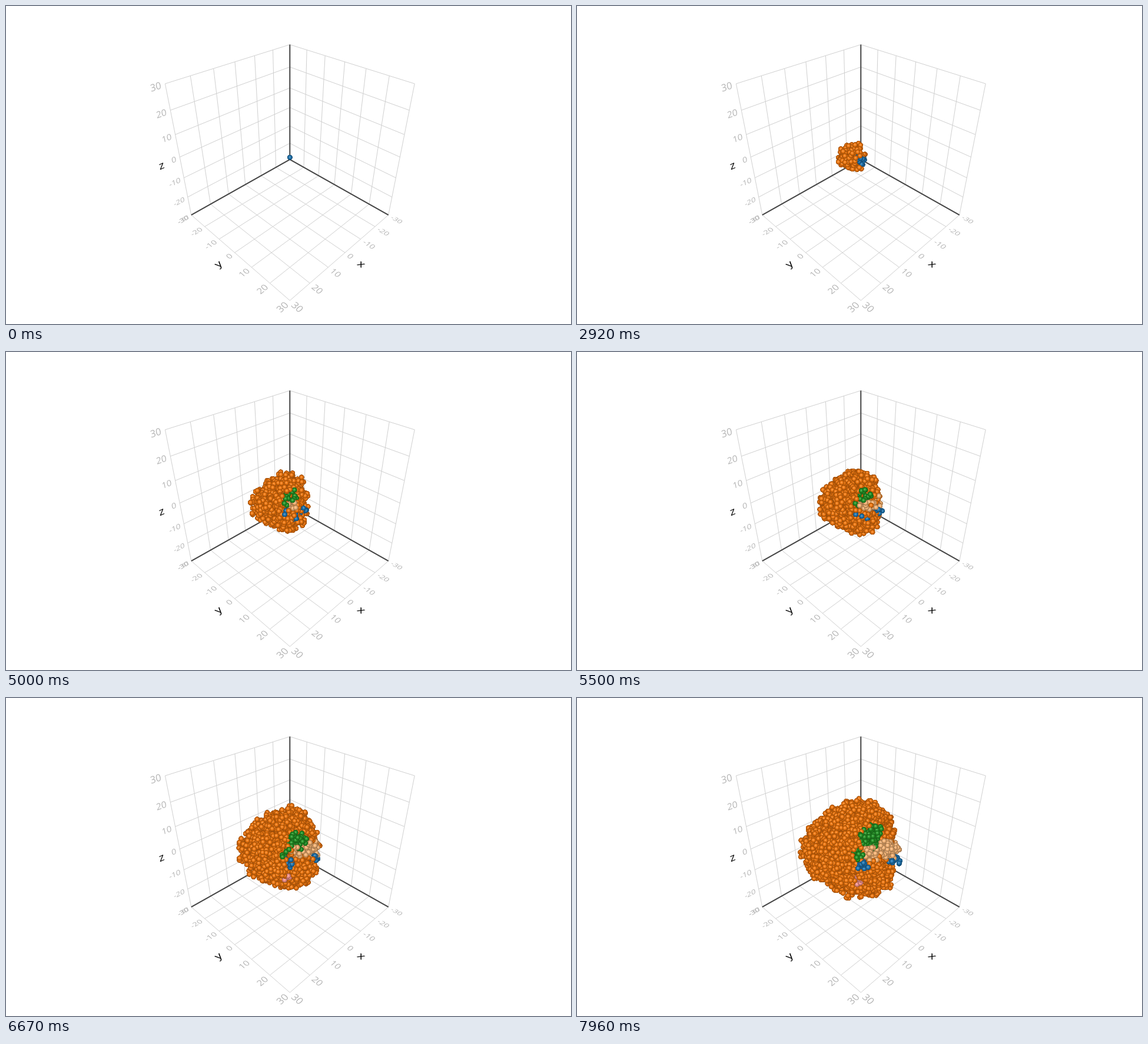
Recreate the animation shown at these times as an HTML page with a canvas. Size 960 by 540 pixels, loop 8000 ms.

```html
<!DOCTYPE html>
<html lang="en">
<head>
<meta charset="utf-8">
<title>Growing cell cluster</title>
<style>
html, body { margin: 0; width: 100%; height: 100%; overflow: hidden; background: #fff; }
canvas { display: block; }
</style>
</head>
<body>
<canvas id="stage" width="960" height="540"></canvas>
<script>
const W = 960, H = 540, LOOP = 8000, STEP = 1000 / 24;
const ctx = document.getElementById('stage').getContext('2d');

// ---- 3D box: coordinates run from -1 to 1 on each axis ----
function project([x, y, z]) {
  const u = (x + y) / 2, v = (y - x) / 2;
  const w = 1 - 0.2385 * u - 0.1173 * z;
  return [482.3 + 187.1 * v / w, (256.5 + 43 * u - 140 * z) / w];
}

function line(g, a, b) {
  g.beginPath();
  g.moveTo(...project(a));
  g.lineTo(...project(b));
  g.stroke();
}

// Text lying in the plane spanned by the directions "along" and "up".
function label(g, text, p, along, up, size, align) {
  const eps = 0.01, px = 20;
  const o = project(p);
  const slope = d => {
    const q = project(p.map((c, i) => c + d[i] * eps));
    return [0, 1].map(i => (q[i] - o[i]) / eps * size / px);
  };
  const a = slope(along), b = slope(up);
  g.save();
  g.setTransform(a[0], a[1], -b[0], -b[1], o[0], o[1]);
  g.font = px + 'px "Open Sans", sans-serif';
  g.textAlign = align;
  g.fillText(text, 0, 0.357 * px);
  g.restore();
}

function buildScene() {
  const c = document.createElement('canvas');
  c.width = W;
  c.height = H;
  const g = c.getContext('2d');
  g.fillStyle = '#fff';
  g.fillRect(0, 0, W, H);

  const ticks = [-3, -2, -1, 0, 1, 2, 3];
  g.strokeStyle = '#d0d0d0';
  g.lineWidth = 1;
  for (const i of ticks) {
    const k = i / 3;
    line(g, [k, -1, -1], [k, 1, -1]);
    line(g, [-1, k, -1], [1, k, -1]);
    line(g, [-1, k, -1], [-1, k, 1]);
    line(g, [-1, -1, k], [-1, 1, k]);
    line(g, [k, -1, -1], [k, -1, 1]);
    line(g, [-1, -1, k], [1, -1, k]);
  }

  g.strokeStyle = '#444';
  g.lineWidth = 2;
  for (const end of [[1, -1, -1], [-1, 1, -1], [-1, -1, 1]]) line(g, [-1, -1, -1], end);

  const left = [-1, 0, 0], right = [0, 1, 0];
  const upX = [-1, 0, 0], upY = [0, -1, 0], upZ = [0, 0, 1];
  const near = 1.053, far = 1.26, tickSize = 0.115, titleSize = 0.15;
  g.fillStyle = '#b4b4b4';
  for (const i of ticks) {
    const k = i / 3, text = String(i * 10);
    label(g, text, [k, near, -1], right, upX, tickSize, 'left');
    label(g, text, [near, k, -1], left, upY, tickSize, 'right');
    label(g, text, [near, -1, k], left, upZ, tickSize, 'right');
  }
  g.fillStyle = '#000';
  label(g, 'x', [0, far, -1], right, upX, titleSize, 'center');
  label(g, 'y', [far, 0, -1], left, upY, titleSize, 'center');
  label(g, 'z', [far, -1, 0], left, upZ, titleSize, 'center');
  return c;
}

// ---- Shaded balls ----
const BALL = 4.5;
const COLORS = {
  orange: [246, 122, 14],
  blue: [31, 119, 180],
  green: [36, 150, 38],
  peach: [250, 183, 118],
  pink: [250, 150, 146]
};

function makeBall(rgb) {
  const c = document.createElement('canvas');
  const r = BALL * 4;
  c.width = c.height = 2 * r;
  const g = c.getContext('2d');
  const tone = (mul, white) =>
    `rgb(${rgb.map(v => Math.round(v * mul + (255 - v * mul) * white)).join()})`;
  const grad = g.createRadialGradient(r * 0.93, r * 0.88, 0, r, r, r);
  grad.addColorStop(0, tone(1, 0.38));
  grad.addColorStop(0.28, tone(1, 0.1));
  grad.addColorStop(0.6, tone(0.9, 0));
  grad.addColorStop(1, tone(0.6, 0));
  g.fillStyle = grad;
  g.beginPath();
  g.arc(r, r, r, 0, 2 * Math.PI);
  g.fill();
  return c;
}

const balls = {};
for (const name in COLORS) balls[name] = makeBall(COLORS[name]);

// ---- Growth: a front that spreads at constant speed ----
const CENTER = { x: 468, y: 256 };
const SPEED = 0.0113, ONSET = 530;

let seed = 20;
function random() {
  seed = (seed * 1664525 + 1013904223) % 4294967296;
  return seed / 4294967296;
}

// Three broad lobes in the picture plane plus small bumps.
function birthTime(x, y, z, r) {
  const lobes = 1 + 0.07 * Math.cos(3 * Math.atan2(y, x) - 2.88) * Math.hypot(x, y) / r;
  const bumps = Math.sin(x * 0.29 + z * 0.1) + Math.sin(y * 0.27 - x * 0.1) + Math.sin(z * 0.25 + y * 0.12);
  const rough = (bumps * 2.6 + (random() - 0.5) * 7) * Math.min(1, r / 40);
  return ONSET + ((r + BALL) / lobes + rough) / SPEED;
}

// Each clone fills a cone: its direction in the picture plane and its width.
const CLONES = [
  { name: 'blue', x: 0.68, y: 0.34, width: 0.4, from: 0, to: 4400 },
  { name: 'peach', x: 0.42, y: 0.11, width: 0.17, from: 3000 },
  { name: 'peach', x: 0.8, y: 0, width: 0.24, from: 5200 },
  { name: 'green', x: 0.42, y: -0.22, width: 0.29, from: 4100 },
  { name: 'green', x: 0.13, y: 0.13, width: 0.14, from: 4400 },
  { name: 'blue', x: 0.21, y: 0.38, width: 0.11, from: 4400 },
  { name: 'blue', x: 0.93, y: 0.24, width: 0.12, from: 4400 },
  { name: 'pink', x: 0.15, y: 0.75, width: 0.09, from: 6300 }
];

function cloneAt(nx, ny, birth) {
  const owner = CLONES.find(({ x, y, width, from, to = LOOP }) =>
    birth > from && birth < to && Math.hypot(nx - x, ny - y) < width * (0.8 + 0.3 * random()));
  return owner ? owner.name : 'orange';
}

function buildCells() {
  const cells = [], pitch = 6.6, n = 16;
  const jitter = () => (random() - 0.5) * pitch * 0.9;
  for (let k = -2; k <= n; k++)
    for (let j = -n; j <= n; j++)
      for (let i = -n; i <= n; i++) {
        const x = i * pitch + jitter(), y = j * pitch + jitter(), z = k * pitch + jitter();
        const r = Math.hypot(x, y, z);
        const birth = birthTime(x, y, z, r);
        if (birth > LOOP) continue;
        const buried = birth + 36 / SPEED;
        const name = cloneAt(x / r, y / r, birth);
        cells.push({ x: CENTER.x + x, y: CENTER.y + y, z, birth, buried, ball: balls[name] });
      }
  cells.push({ x: 482.3, y: 257, z: -99, birth: 0, buried: LOOP, ball: balls.blue });
  return cells.sort((a, b) => a.z - b.z);
}

const cells = buildCells();
const scene = buildScene();

function draw(time) {
  ctx.drawImage(scene, 0, 0);
  for (const c of cells) {
    if (c.birth > time || c.buried < time) continue;
    ctx.drawImage(c.ball, c.x - BALL, c.y - BALL, 2 * BALL, 2 * BALL);
  }
}

const start = performance.now();
function tick() {
  const time = (performance.now() - start) % LOOP;
  draw(Math.floor(time / STEP + 0.01) * STEP);
  requestAnimationFrame(tick);
}
tick();
</script>
</body>
</html>
```
